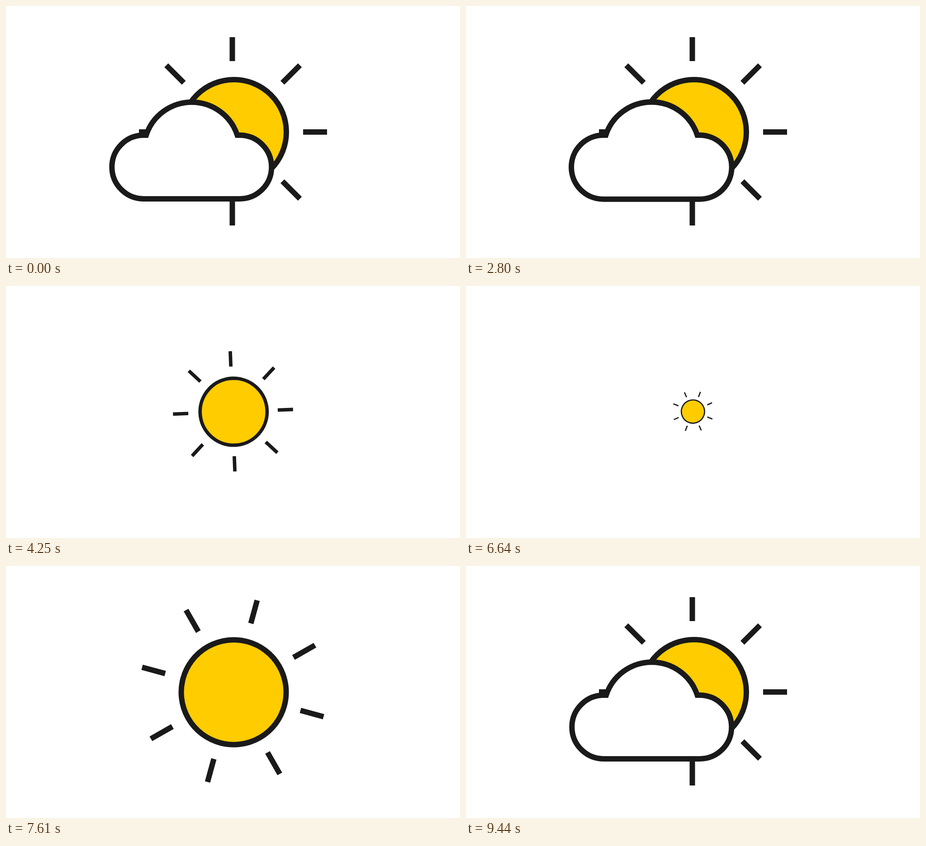
Animation, 1004 px wide and 558 px high, one loop 9510 ms. Source, as an HTML page:

```html
<!DOCTYPE html>
<html lang="en">
<head>
<meta charset="utf-8">
<title>Sun and cloud</title>
<style>
  html, body { margin: 0; width: 100%; height: 100%; overflow: hidden; background: #fff; }
  svg { display: block; width: 100vw; height: 100vh; }
</style>
</head>
<body>
<svg viewBox="0 0 1004 558" fill="none" stroke="#1a1a1a" stroke-width="12">
  <g id="sun">
    <circle cx="504" cy="279" r="116" fill="#fc0"/>
    <path d="M500.5 69v53M500.5 433v53M294 279h53M657 279h53
      M354.5 131.3l38.7 38.7M650 131.3l-38.7 38.7M354.5 426.7l38.7 -38.7M650 426.7l-38.7 -38.7"/>
  </g>
  <path id="cloud" fill="#fff" stroke-miterlimit="10"
    d="M304.75 427a70.5 70.5 0 0 1 0 -141H310A106 106 0 0 1 511.5 286H516.75a70.5 70.5 0 0 1 0 141Z"/>
</svg>
<script>
const LOOP = 9.51;
const SUN_PIVOT = [502, 277.5], CLOUD_CENTER = [410.75, 320];
const sun = document.getElementById('sun');
const cloud = document.getElementById('cloud');

function place(el, [px, py], scale, dx = 0, dy = 0, angle = 0) {
  el.style.display = scale > 0 ? '' : 'none';
  el.setAttribute('transform',
    `translate(${px + dx} ${py + dy}) rotate(${angle}) scale(${scale}) translate(${-px} ${-py})`);
}

const swing = s => 45 * (1 - Math.cos(1.25 * s));

function backOut(x) {
  const u = Math.min(x, 1) - 1;
  return 1 + 1.8 * u ** 3 + 0.8 * u ** 2;
}

function drawSun(t) {
  let scale = 1, angle = 0;
  if (t > 4 && t < 6.578) {
    scale = Math.max(0, 1 - (t - 4) / 0.84) ** 1.263;
    angle = -swing(t - 4);
  } else if (t >= 6.578) {
    scale = backOut(t - 6.578);
    angle = swing(Math.max(0, 8.29 - t));
  }
  place(sun, SUN_PIVOT, scale, 0, 0, angle);
}

function drawCloud(t) {
  if (t < 3) {
    // one breath: swells from 1 s to 2 s, settles by 3 s
    const breath = t > 1 ? 0.025 * (1 - Math.cos(Math.PI * (t - 1))) : 0;
    return place(cloud, SUN_PIVOT, 1 + breath);
  }
  // x: 0 at rest, 1 when fully away; leaves to the right, returns from the left
  const leaving = t < 6;
  const x = Math.min(1, leaving ? (t - 3) / 0.94 : Math.max(0, 1 - (t - 8.57) / 0.87));
  place(cloud, CLOUD_CENTER, 1 - x ** 4, (leaving ? 582 : -389) * x * x, 43 * x * x);
}

function frame() {
  const t = performance.now() / 1000 % LOOP;
  drawSun(t);
  drawCloud(t);
  requestAnimationFrame(frame);
}
frame();
</script>
</body>
</html>
```
